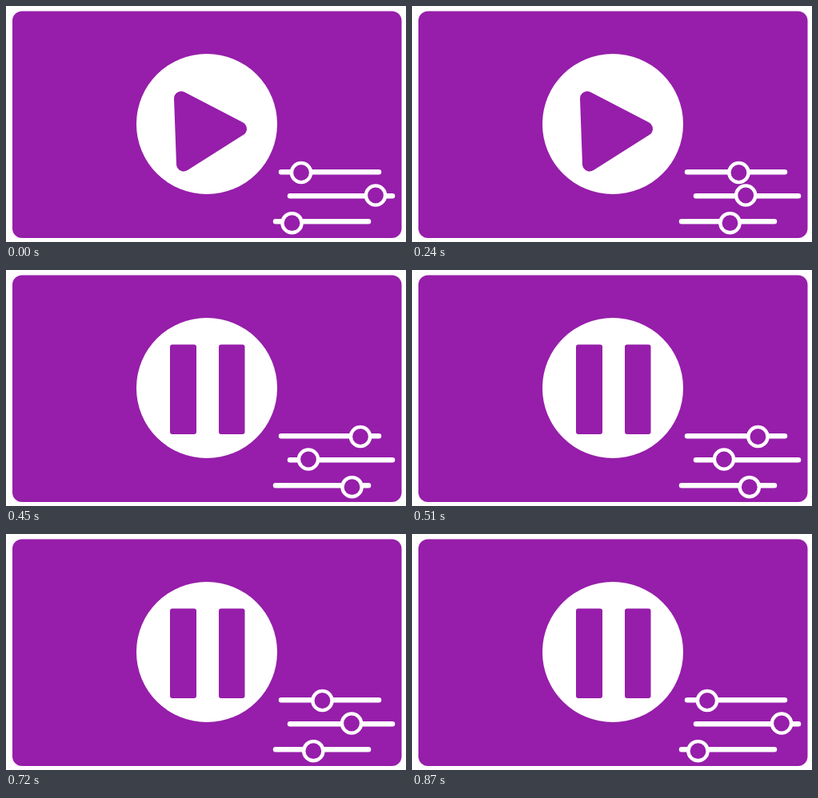
Animation, 500 px wide and 296 px high, one loop 0.93 s. Source, as an HTML page:

```html
<!DOCTYPE html>
<html lang="en">
<head>
<meta charset="utf-8">
<title>Player controls</title>
<style>
  html, body { margin: 0; width: 100%; height: 100%; overflow: hidden; background: #fff; }
  svg { display: block; }
  .purple { fill: #961eaa; }
  #play { stroke: #961eaa; stroke-width: 18; stroke-linejoin: round; }
  .track { stroke: #fff; stroke-width: 6.5; stroke-linecap: round; }
  .knob { stroke: #fff; stroke-width: 4.4; }
</style>
</head>
<body>
<svg width="500" height="296" viewBox="0 0 500 296">
  <rect class="purple" x="8" y="6.5" width="486.5" height="284.5" rx="12"/>
  <circle cx="251" cy="148" r="88" fill="#fff"/>
  <path id="play" class="purple" d="M219 116L292 154L222 198.500Z"/>
  <g id="pause" class="purple">
    <rect x="205" y="93.500" width="33" height="112.500" rx="3"/>
    <rect x="266" y="93.500" width="32.500" height="112.500" rx="3"/>
  </g>
  <path class="track" d="M344 208.300H466M355 238.300H483M337 270.300H453"/>
  <circle class="knob purple" cy="209" r="12.100"/>
  <circle class="knob purple" cy="237.500" r="12.100"/>
  <circle class="knob purple" cy="272.200" r="12.100"/>
</svg>
<script>
  const LOOP = 930, STEP = 30, TURN = 450, BACK = 870;
  const play = document.getElementById('play');
  const pause = document.getElementById('pause');
  const knobs = document.querySelectorAll('.knob');
  const ranges = [[369, 443], [462, 378], [357.5, 432.5]];

  function draw(now) {
    const t = Math.min(BACK, Math.floor(now % LOOP / STEP) * STEP);
    const p = t < TURN ? t / TURN : (BACK - t) / (BACK - TURN);
    ranges.forEach(([from, to], i) => knobs[i].setAttribute('cx', from + (to - from) * p));
    play.style.display = t < TURN ? '' : 'none';
    pause.style.display = t < TURN ? 'none' : '';
  }

  const start = performance.now();
  function tick() {
    draw(performance.now() - start);
    requestAnimationFrame(tick);
  }
  tick();
</script>
</body>
</html>
```
